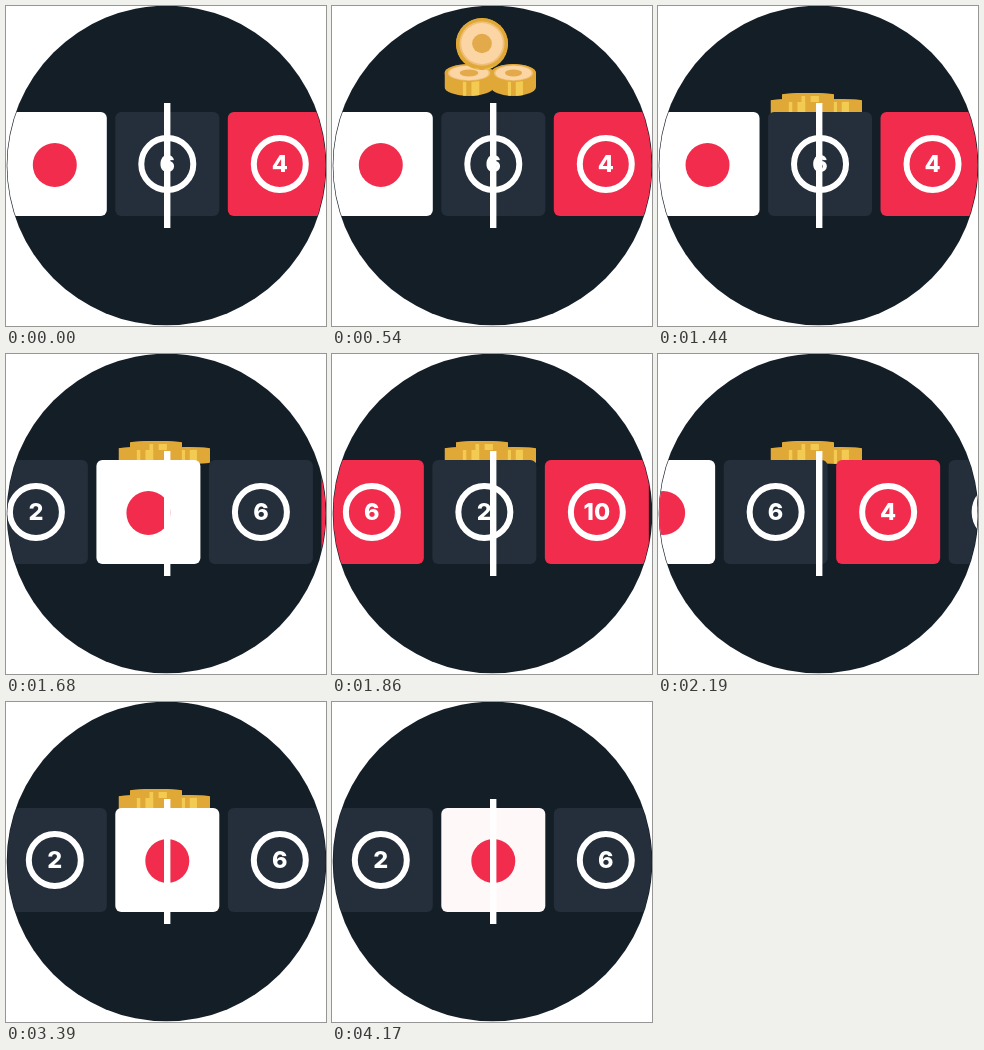
An HTML page with a canvas for the animation above (4.5 s loop, 320 by 320 pixels).

```html
<!DOCTYPE html>
<html lang="en">
<head>
<meta charset="utf-8">
<title>Roulette strip</title>
<style>
html, body { margin: 0; width: 100%; height: 100%; overflow: hidden; background: #fff; }
canvas { display: block; width: 320px; height: 320px; }
</style>
</head>
<body>
<canvas id="stage" width="320" height="320"></canvas>
<script>
const ctx = document.getElementById('stage').getContext('2d');
const LOOP = 4500, PITCH = 112.5, SIZE = 104, CX = 161.3, CY = 158, STEPS = 9;
const RED = '#f12c4c', DARK = '#252f3b', GOLD = '#e0a836', SHINE = '#f3cb52', FACE = '#fbd6a4';

// Tiles from left to right; 0 is the white one, reds are negative.
const strip = [-10, 2, 0, 6, -4, 8, -6, 2, -10, 2, 0, 6, -4, 8];
const START = 11;

const clamp = v => Math.min(1, Math.max(0, v));
const phase = (t, from, to) => clamp((t - from) / (to - from));
const smooth = p => p < .5 ? 4 * p ** 3 : 1 - 4 * (1 - p) ** 3;
const mix = (a, b, p) => a + (b - a) * p;

// Cubic Bezier easing with control points (x1, 0) and (x2, 1).
function bezier(x, x1, x2) {
  let lo = 0, hi = 1;
  for (let i = 0; i < 24; i++) {
    const s = (lo + hi) / 2, r = 1 - s;
    if (3 * x1 * s * r * r + 3 * x2 * s * s * r + s ** 3 < x) lo = s; else hi = s;
  }
  return lo * lo * (3 - 2 * lo);
}

function oval(x, y, rx, ry, fill) {
  ctx.fillStyle = fill;
  ctx.beginPath();
  ctx.ellipse(x, y, rx, ry, 0, 0, 7);
  ctx.fill();
}

// A coin whose face is tilted by ry / rx, with an edge of height h below it.
function coin(x, y, rx, ry, h, alpha, flat) {
  ctx.save();
  ctx.globalAlpha = alpha;
  ctx.beginPath();
  ctx.ellipse(x, y + h, rx, ry, 0, 0, Math.PI);
  ctx.lineTo(x - rx, y);
  ctx.ellipse(x, y, rx, ry, 0, Math.PI, 2 * Math.PI);
  ctx.closePath();
  ctx.clip();
  ctx.fillStyle = GOLD;
  ctx.fillRect(x - rx, y - ry, 2 * rx, 2 * ry + h);
  ctx.fillStyle = SHINE;
  ctx.fillRect(x - rx * .25, y, rx * .14, h + ry);
  ctx.fillRect(x + rx * .1, y, rx * .32, h + ry);
  oval(x, y, rx, ry, GOLD);
  ctx.globalAlpha = alpha * (1 - flat);
  oval(x, y, rx * .87, ry * .87, '#f0bf78');
  oval(x, y, rx * .8, ry * .8, FACE);
  oval(x, y, rx * .38, ry * .38, '#e3aa4c');
  ctx.restore();
}

function coins(t) {
  const p = smooth(phase(t, 545, 1200));
  const alpha = phase(t, 0, 540) * (1 - phase(t, 3390, 4170));
  const lie = mix(9, 1.5, p), y = mix(67, 94.5, p);
  coin(181.5, y, 22.5, lie, 14, alpha, p);
  coin(137, y, 24.5, lie, 14, alpha, p);
  coin(150, mix(37.5, 88.5, p), 26, mix(25.5, 1.5, p), mix(1, 6, p), alpha, p);
}

function tile(x, value, tint) {
  const pale = Math.round(255 - 7 * tint);
  ctx.fillStyle = value < 0 ? RED : value ? DARK : `rgb(255,${pale},${pale})`;
  ctx.beginPath();
  ctx.roundRect(x - SIZE / 2, 106, SIZE, SIZE, 6);
  ctx.fill();
  if (!value) return oval(x, 159, 22, 22, RED);
  ctx.strokeStyle = ctx.fillStyle = '#fff';
  ctx.lineWidth = 6;
  ctx.beginPath();
  ctx.arc(x, CY, 26, 0, 7);
  ctx.stroke();
  ctx.fillText(Math.abs(value), x, 166.3);
}

function draw(t) {
  ctx.clearRect(0, 0, 320, 320);
  oval(160.5, 159.5, 159.8, 159.8, '#131e27');
  ctx.save();
  ctx.beginPath();
  ctx.arc(160.5, 159.5, 159.2, 0, 7);
  ctx.clip();
  coins(t);

  ctx.font = '800 23.5px Inter, "Open Sans", sans-serif';
  ctx.textAlign = 'center';
  const shift = STEPS * PITCH * bezier(phase(t, 1410, 2940), .446, .056);
  const tint = phase(t, 3390, 3900);
  strip.forEach((value, i) => {
    const x = CX + (i - START) * PITCH + shift;
    if (x > -SIZE && x < 320 + SIZE) tile(x, value, tint);
  });

  ctx.fillStyle = '#fff';
  ctx.fillRect(158, 97, 6.4, 125);
  ctx.restore();
}

const begin = performance.now();
function frame() {
  draw((performance.now() - begin) % LOOP);
  requestAnimationFrame(frame);
}
frame();
</script>
</body>
</html>
```
